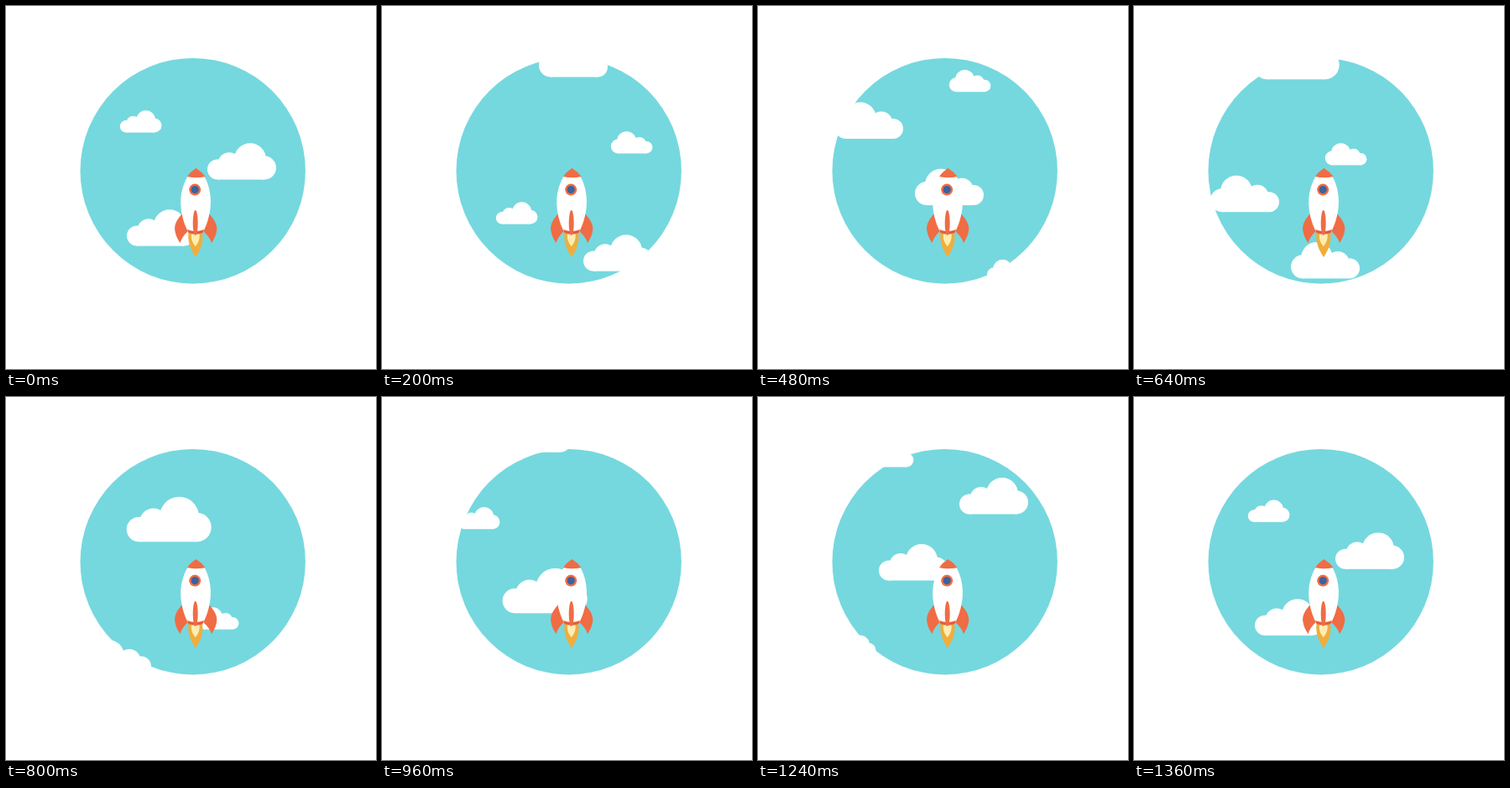
These frames come from a looping animation (441 px wide and 432 px high, 1400 ms). An HTML page:

```html
<!DOCTYPE html>
<html lang="en">
<head>
<meta charset="utf-8">
<title>Rocket flight</title>
<style>
  html, body { margin: 0; width: 100%; height: 100%; overflow: hidden; background: #fff; }
  svg { display: block; width: 441px; height: 432px; }
</style>
</head>
<body>
<svg viewBox="0 0 441 432">
  <defs>
    <!-- 82 wide, bottom edge on y = 0 -->
    <g id="cloud" fill="#fff">
      <circle cx="12" cy="-12" r="12"/>
      <circle cx="26" cy="-19" r="13.4"/>
      <circle cx="51" cy="-24.4" r="19"/>
      <circle cx="68" cy="-14" r="14"/>
      <rect x="12" y="-20" width="56" height="20"/>
    </g>
  </defs>
  <circle cx="222.7" cy="196.2" r="134.2" fill="#75d8de"/>
  <g id="sky"></g>
  <g id="rocket">
    <path d="M217.5 270C216 282 221 291 226 299C231 291 236 282 234 270Z" fill="#f0ad3e"/>
    <path d="M221 270C220 278 223 283 225.7 286C228.5 283 231.500 278 230.500 270Z" fill="#fdeeb0"/>
    <path d="M210 247C203 255 200 261 201.500 268C202.500 274 205 278 207.500 282C209 277 212 272 217 268Z" fill="#f06c44"/>
    <path d="M242 247C249 255 252.500 261 251 268C250 274 247.500 278 245 282C243.500 277 240 272 235 268Z" fill="#f06c44"/>
    <path d="M216.500 203C205 222 206 246 216.500 268Q226 271 235.500 268C246 246 247 222 236.500 203Z" fill="#fff"/>
    <path d="M226.500 193Q220 197 216 203Q226.500 205.500 237.500 203Q233 197 226.500 193Z" fill="#f06c44"/>
    <path d="M216 266Q226 270 236 266L234.500 270Q226 273.500 217.500 270Z" fill="#e0603c"/>
    <ellipse cx="225.700" cy="258" rx="3" ry="15" fill="#f06c44"/>
    <circle cx="225.200" cy="218.600" r="7" fill="#f06c44"/>
    <circle cx="225.200" cy="218.600" r="4.600" fill="#3a63a0"/>
  </g>
</svg>
<script>
const STEP = 40, STEPS = 35, SPEED = 21.8, WRAP = 743;
const MID = 1, SMALL = 0.605, BIG = 1.232;

// left edge, bottom at the start, size, mirrored, speed
const clouds = [
  [135.8, 150.6, SMALL, false],
  [240, 206.6, MID, false],
  [144, 285.6, MID, false],
  [187, -24.5, MID, true],
  [272.8, 66.5, SMALL, true],
  [227.8, -159.4, SMALL, true],
  [91, -103.6, MID, true],
  [143.700, -252.7, BIG, false, 21.25],
  [90.8, -366, SMALL, false]
];

const sky = document.getElementById('sky');
const nodes = clouds.map(() => {
  const use = document.createElementNS('http://www.w3.org/2000/svg', 'use');
  use.setAttribute('href', '#cloud');
  return sky.appendChild(use);
});

const wrap = y => ((y + 368) % WRAP + WRAP) % WRAP - 368;

function draw(step) {
  clouds.forEach(([x, y, size, mirrored, speed = SPEED], i) => {
    const left = mirrored ? x + 82 * size : x;
    const bottom = wrap(y + speed * step);
    nodes[i].setAttribute('transform',
      `translate(${left} ${bottom}) scale(${mirrored ? -size : size} ${size})`);
  });
}

const start = performance.now();
function tick() {
  draw(Math.floor((performance.now() - start) / STEP) % STEPS);
  requestAnimationFrame(tick);
}
tick();
</script>
</body>
</html>
```
